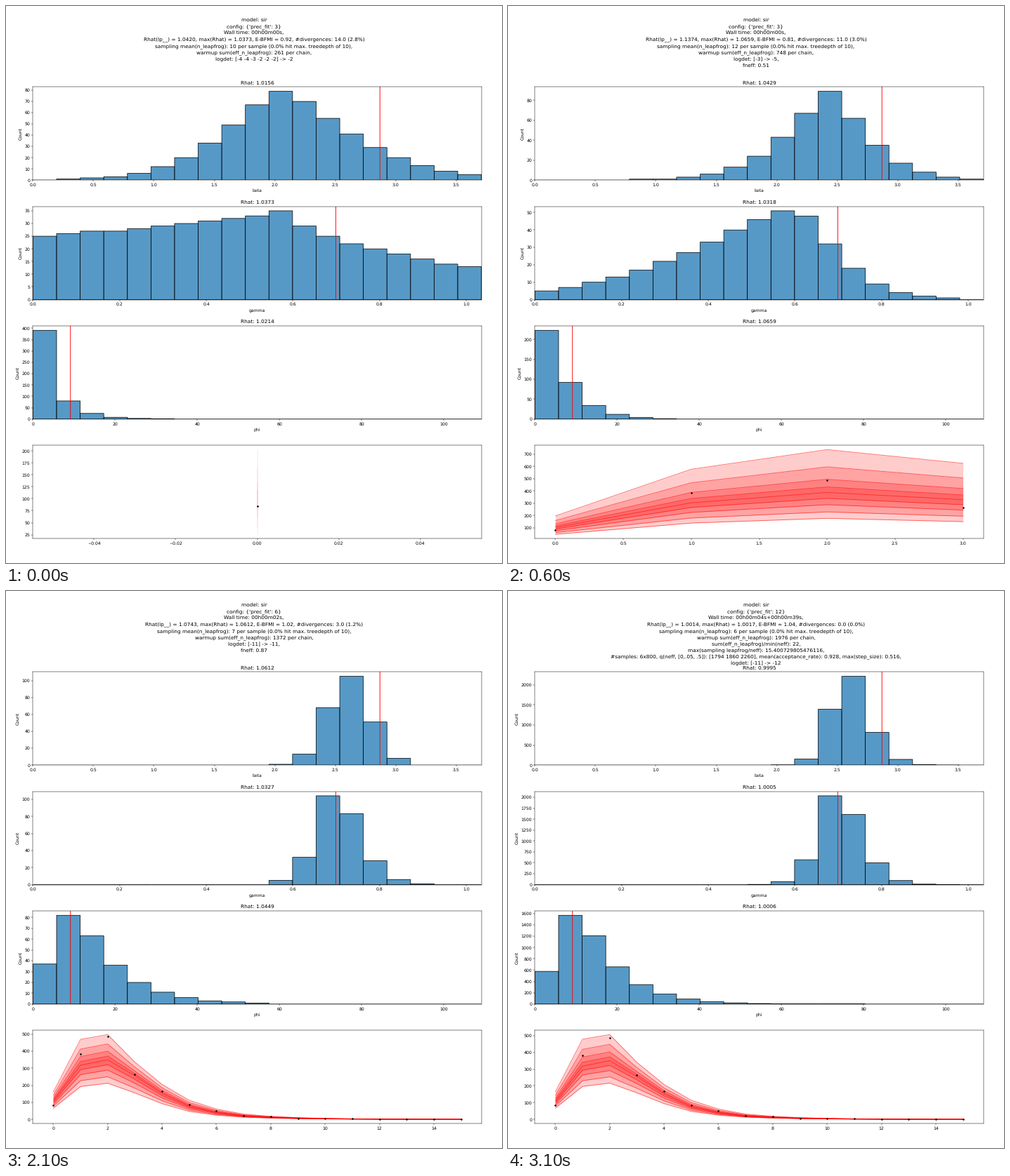
Animation, 706 px wide and 794 px high, one loop 3.6 s. Source, as a matplotlib script:

```python
import numpy as np
import matplotlib.pyplot as plt
from matplotlib.animation import FuncAnimation

W, H, DPI = 706, 794, 44.125
BINS = 19
TICK = 100

plt.rcParams["font.family"] = "DejaVu Sans"
plt.rcParams["text.hinting"] = "none"

# Histogram shape per step: peak, mode (in bins), left width, right width, power
BETA = [
    (79, 10, 3.25, 4, 1.5),
    (38, 11, 3.3, 3.3, 1.6),
    (89, 12, 2.5, 2.1, 1.4),
    (196, 12.6, 1.1, 1.15, 1.7),
    (107, 12.85, 1.3, 1.32, 2),
    (105, 12.85, 1.27, 1.35, 2),
    (104, 12.85, 1.25, 1.35, 2),
    (2210, 12.65, 0.9, 1.27, 1.7),
]
GAMMA = [
    (35, 10, 40, 8, 0.8),
    (19, 8, 20, 10, 1.2),
    (51, 10.5, 6, 2.4, 1.5),
    (179, 11.8, 1.5, 1.4, 1.8),
    (120, 12.1, 0.9, 1.3, 1.3),
    (104, 12.3, 1.1, 1.35, 1.6),
    (91, 12.51, 1.4, 1.4, 2),
    (2033, 12.3, 1.05, 1.3, 1.6),
]
PHI = [
    (391, 0, 1, 0.56, 0.8),
    (160, 0, 1, 0.85, 0.9),
    (223, 0, 1, 1.12, 1.1),
    (166, 1.3, 1.05, 1.5, 1.2),
    (82, 1.3, 1.25, 1.8, 1.2),
    (82, 1.2, 1.3, 1.9, 1.1),
    (81, 1, 1.5, 2, 1),
    (1570, 1.2, 1.05, 1.75, 1.1),
]
# name, upper limit, true value, shapes
PARAMS = [
    ("beta", 3.709, 2.87, BETA),
    ("gamma", 1.035, 0.699, GAMMA),
    ("phi", 109.15, 9.12, PHI),
]
RHAT = [
    "1.0156 1.0373 1.0214",
    "1.0312 1.0278 1.0562",
    "1.0429 1.0318 1.0659",
    "1.0058 0.9978 1.0641",
    "1.0701 1.0584 1.0584",
    "1.0612 1.0327 1.0449",
    "1.0199 1.0394 1.0536",
    "0.9995 1.0005 1.0006",
]

MEDIAN = [109, 318, 350, 256, 152, 77, 41, 21]
OBSERVED = [84, 383, 487, 263, 167, 86, 52, 23, 18, 6, 4, 3]
NESTED = [1, 0.67, 0.38, 0.17]
# points, growth of the median, log width above and below, narrowing after the peak
BANDS = [
    (1, 1.10, 0.65, 1.42, 0),
    (2, 1.16, 0.72, 1.0, 0),
    (4, 1.16, 0.64, 0.78, 0),
    (8, 1.035, 0.394, 0.50, 0.1),
    (16, 1, 0.415, 0.49, 0.33),
    (16, 1, 0.395, 0.50, 0.33),
    (16, 1, 0.372, 0.51, 0.33),
    (16, 1, 0.413, 0.48, 0.33),
]

# prec_fit, wall time, lp Rhat, max Rhat, E-BFMI, divergences, leapfrogs, warmup, tail
STATS = [
    (3, "00h00m00s", "1.0420", "1.0373", "0.92", "14.0 (2.8%)", 10, 261,
     ["logdet: [-4 -4 -3 -2 -2 -2] -> -2"]),
    (3, "00h00m00s", "1.0893", "1.0562", "0.87", "9.0 (3.6%)", 11, 512,
     ["logdet: [-2] -> -3,", "fneff: 0.71"]),
    (3, "00h00m00s", "1.1374", "1.0659", "0.81", "11.0 (3.0%)", 12, 748,
     ["logdet: [-3] -> -5,", "fneff: 0.51"]),
    (3, "00h00m01s", "1.0511", "1.0641", "0.95", "2.0 (0.4%)", 13, 975,
     ["logdet: [-5] -> -11,", "fneff: 0.08"]),
    (3, "00h00m01s", "1.0815", "1.0701", "0.99", "1.0 (0.4%)", 8, 1069,
     ["logdet: [-11] -> -11,", "fneff: 0.51"]),
    (6, "00h00m02s", "1.0743", "1.0612", "1.02", "3.0 (1.2%)", 7, 1372,
     ["logdet: [-11] -> -11,", "fneff: 0.87"]),
    (12, "00h00m04s", "1.0881", "1.0536", "1.06", "7.0 (2.8%)", 7, 1676,
     ["logdet: [-11] -> -11,", "fneff: 1.00"]),
    (12, "00h00m04s+00h00m39s", "1.0014", "1.0017", "1.04", "0.0 (0.0%)", 6, 1976,
     ["sum(eff_n_leapfrog)/min(neff): 22,",
      "max(sampling leapfrog/neff): 15.400729805476116,",
      "#samples: 6x800, q(neff, [0,.05, .5]): [1794 1860 2260], "
      "mean(acceptance_rate): 0.928, max(step_size): 0.516,",
      "logdet: [-11] -> -12"]),
]

fig = plt.figure(figsize=(W / DPI, H / DPI), dpi=DPI, facecolor="white")
axes = [fig.add_axes([38.4 / W, 1 - (248.2 + 170.33 * i) / H, 638.2 / W, 132.9 / H])
        for i in range(4)]
heading = [fig.text(0.5, 1 - (22 + 9.22 * i) / H, "", ha="center", va="baseline",
                    fontsize=12, zorder=10) for i in range(10)]


def header(step):
    prec, wall, lp, worst, bfmi, div, leaps, warmup, tail = STATS[step]
    return [
        "model: sir",
        f"config: {{'prec_fit': {prec}}}",
        f"Wall time: {wall},",
        f"Rhat(lp__) = {lp}, max(Rhat) = {worst}, E-BFMI = {bfmi}, #divergences: {div}",
        f"sampling mean(n_leapfrog): {leaps} per sample (0.0% hit max. treedepth of 10),",
        f"warmup sum(eff_n_leapfrog): {warmup} per chain,",
    ] + tail


def bell(peak, mode, left, right, power):
    """Bin counts of a two-sided bell whose tallest bin equals peak."""
    d = np.arange(BINS) - mode
    shape = np.exp(-(np.abs(d) / np.where(d < 0, left, right)) ** power)
    return np.round(peak * shape / shape.max())


def histogram(ax, step, k):
    name, top, truth, shapes = PARAMS[k]
    counts = bell(*shapes[step])
    width = top / BINS
    ax.bar(np.arange(BINS) * width, counts, width, align="edge",
           facecolor=(0x1F / 255, 0x77 / 255, 0xB4 / 255, 0.75),
           edgecolor="black", linewidth=1.2, snap=False)
    ax.axvline(truth, color="red", snap=False)
    ax.set(xlim=(0, top), ylim=(0, counts.max() * 1.05), xlabel=name,
           ylabel="Count", title="Rhat: " + RHAT[step].split()[k])


def series(values, n):
    """First n values, continued by exponential decay where they run out."""
    extra = values[-1] * 0.58 ** np.arange(1, n - len(values) + 1)
    return np.concatenate([values[:n], extra])


def prediction(ax, step):
    n, growth, above, below, dip = BANDS[step]
    x = np.arange(n)
    mid = series(MEDIAN, n) * growth ** np.maximum(x - 1.3, -0.3)
    above = above * (1 - dip * np.exp(-(x - 3.3) ** 2 / 1.5))
    for s in NESTED:
        lo, hi = mid * np.exp(-below * s), mid * np.exp(above * s)
        if n == 1:
            ax.vlines(x, lo, hi, color="red", alpha=0.2, linewidth=0.8)
            continue
        ax.fill_between(x, lo, hi, color="red", alpha=0.2, linewidth=0)
        ax.plot(x, lo, x, hi, color="red", alpha=0.55)
    if n > 1:
        ax.plot(x, mid, color="red", alpha=0.55)
    ax.plot(x, series(OBSERVED, n), "k.")


shown = None


def update(frame):
    global shown
    # a short first step, then one step every 500 ms
    step = (frame * TICK + 400) // 500
    if step != shown:
        shown = step
        lines = header(step)
        for i, text in enumerate(heading):
            text.set_text(lines[i] if i < len(lines) else "")
        for k, ax in enumerate(axes):
            ax.clear()
            if k < 3:
                histogram(ax, step, k)
            else:
                prediction(ax, step)
    return heading + axes


anim = FuncAnimation(fig, update, frames=36, interval=TICK, repeat=True,
                     repeat_delay=0, blit=False)
plt.show()
```
